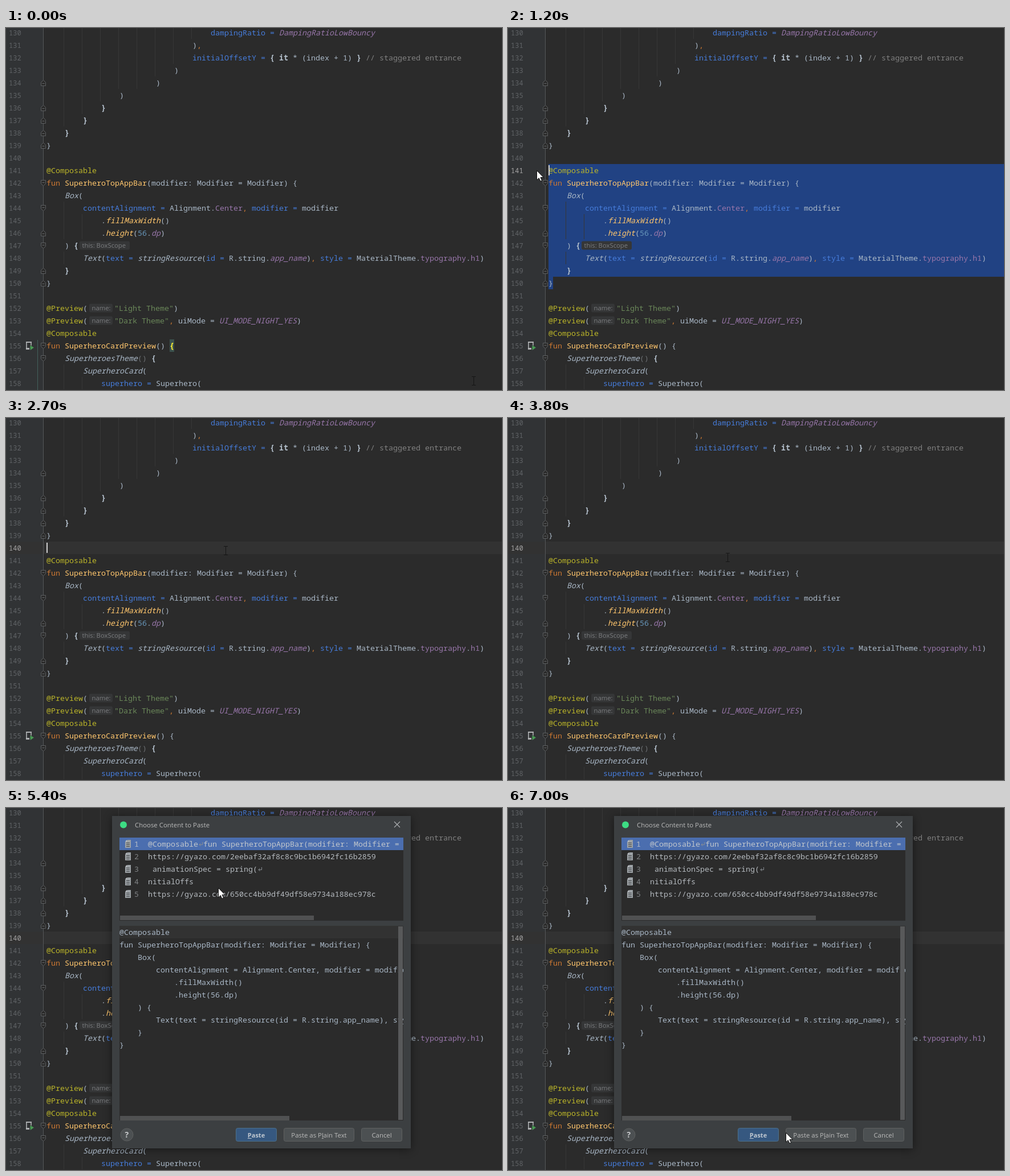
These frames come from a looping animation (870x636 px, 7.1 s). An HTML page with a canvas:

```html
<!DOCTYPE html>
<html lang="en">
<head>
<meta charset="utf-8">
<title>Paste from history</title>
<style>
  html, body { margin: 0; width: 100%; height: 100%; overflow: hidden; background: #2b2b2b; }
  canvas { display: block; width: 870px; height: 636px; }
</style>
</head>
<body>
<canvas id="stage" width="870" height="636"></canvas>
<script>
const ctx = document.getElementById('stage').getContext('2d');
const W = 870, H = 636, LOOP = 7100, STEP = 100;
const ROW = 22, COL = 8, LEFT = 71, FIRST = 130;
const MONO = '"Noto Sans Mono", "DejaVu Sans Mono", monospace';
const SANS = '"Open Sans", "Noto Sans", sans-serif';
const PRESS = 500, DRAG_END = 1300, CLICK = 2700, DIALOG = 4100;

// Each style: colour, font prefix
const STYLES = {
  d: ['#a9b7c6'], i: ['#a9b7c6', 'italic 500'], B: ['#b4c0cc', 'bold'],
  b: ['#467cda'], p: ['#9876aa'], m: ['#9876aa', 'italic 500'],
  o: ['#cc7832'], y: ['#bbb529'], f: ['#ffc66d'], g: ['#ffc66d', 'italic 500'],
  s: ['#6a8759'], n: ['#6897bb'], c: ['#808080'], u: ['#6c6f72']
};

// indent|style+text|...   "h" is an inlay hint
const CODE = [
  '36|bdampingRatio = |mDampingRatioLowBouncy',
  '32|d)|o,',
  '32|binitialOffsetY = |B{ it |d* (index + 1) |B} |c// staggered entrance',
  '28|d)', '24|d)', '16|d)', '12|B}', '8|B}', '4|B}', '0|d}', '0',
  '0|y@Composable',
  '0|ofun |fSuperheroTopAppBar|d(modifier: Modifier = Modifier) {',
  '4|iBox|d(',
  '8|bcontentAlignment = |dAlignment.|pCenter|o, |bmodifier = |dmodifier',
  '12|d.|gfillMaxWidth|d()',
  '12|d.|gheight|d(|n56|d.|mdp|d)',
  '4|d) |B{|hthis: BoxScope',
  '8|iText|d(|btext = |istringResource|d(|bid = |dR.string.|mapp_name|d)|o, |bstyle = |dMaterialTheme.|ptypography|d.|ph1|d)',
  '4|B}', '0|d}', '0',
  '0|y@Preview|d(|hname:|s"Light Theme"|d)',
  '0|y@Preview|d(|hname:|s"Dark Theme"|o, |duiMode = |mUI_MODE_NIGHT_YES|d)',
  '0|y@Composable',
  '0|ofun |fSuperheroCardPreview|d() {',
  '4|iSuperheroesTheme|u() |B{',
  '8|iSuperheroCard|d(',
  '12|bsuperhero = |dSuperhero('
].map(line => line.split('|'));

const FOLD_START = [142, 144, 147, 155, 156];
const FOLD_END = [134, 136, 137, 138, 139, 146, 149, 150];

// column, first row, last row
const GUIDES = [
  [4, 130, 137], [8, 130, 136], [12, 130, 135], [16, 130, 134], [20, 130, 134],
  [24, 130, 133], [28, 130, 132], [32, 130, 130],
  [4, 144, 146], [8, 145, 146], [4, 148, 148], [4, 157, 158], [8, 158, 158]
];

const MOUSE = [
  [0, 820, 620], [100, 820, 620], [500, 82, 448], [900, 48, 315], [1200, 50, 250],
  [1500, 50, 250], [1900, 330, 256], [2300, 400, 232], [2700, 385, 233], [3000, 385, 244],
  [5100, 385, 246], [5400, 372, 140], [5900, 384, 74], [6300, 432, 330],
  [6700, 546, 570], [7000, 487, 570]
];

const CLIPS = [
  '@Composable\nfun SuperheroTopAppBar(modifier: Modifier = Modifier) {',
  'https://gyazo.com/2eebaf32af8c8c9bc1b6942fc16b2859',
  ' animationSpec = spring(\n',
  'nitialOffs',
  'https://gyazo.com/650cc4bb9df49df58e9734a188ec978c'
];

const rowMid = n => 8 + (n - FIRST) * ROW;
const rowTop = n => rowMid(n) - 11;

function rect(x, y, w, h, color) {
  ctx.fillStyle = color;
  ctx.fillRect(x, y, w, h);
}

function pill(x, y, w, h, r, fill, line) {
  ctx.beginPath();
  ctx.roundRect(x, y, w, h, r);
  ctx.fillStyle = fill;
  ctx.fill();
  if (line) {
    ctx.strokeStyle = line;
    ctx.stroke();
  }
}

function poly(points, fill, line) {
  ctx.beginPath();
  points.forEach(([x, y]) => ctx.lineTo(x, y));
  ctx.closePath();
  if (fill) { ctx.fillStyle = fill; ctx.fill(); }
  if (line) { ctx.strokeStyle = line; ctx.stroke(); }
}

function strokes(color, width, ...lines) {
  ctx.strokeStyle = color;
  ctx.lineWidth = width;
  ctx.beginPath();
  for (const [x1, y1, x2, y2] of lines) {
    ctx.moveTo(x1, y1);
    ctx.lineTo(x2, y2);
  }
  ctx.stroke();
  ctx.lineWidth = 1;
}

function text(str, x, y, color, font) {
  ctx.font = font;
  ctx.fillStyle = color;
  ctx.fillText(str, x, y);
}

const mono = (str, x, mid, color, face = '500') =>
  text(str, x, mid + 5, color, `${face} 13.333px ${MONO}`);

function mouseAt(t) {
  const k = Math.max(1, MOUSE.findIndex(p => p[0] >= t));
  const [t0, x0, y0] = MOUSE[k - 1], [t1, x1, y1] = MOUSE[k];
  const u = Math.min(1, (t - t0) / (t1 - t0));
  return { x: x0 + (x1 - x0) * u, y: y0 + (y1 - y0) * u };
}

function caretRow(t) {
  if (t < PRESS) return 0;
  if (t >= CLICK) return 140;
  return FIRST + Math.floor((mouseAt(Math.min(t, DRAG_END)).y + 3) / ROW);
}

function hint(str, x, mid) {
  const w = str === 'name:' ? 41 : 88;
  pill(x + 3, mid - 7.5, w, 15, 3, '#353637');
  text(str, x + 7.5, mid + 4, '#7c7e80', `11.3px ${SANS}`);
}

function codeLine(parts, mid) {
  let x = LEFT + COL * parts[0];
  for (const part of parts.slice(1)) {
    const str = part.slice(1);
    if (part[0] === 'h') {
      hint(str, x - (str === 'name:' ? 0 : 1), mid);
      x += 47;
    } else {
      const [color, face] = STYLES[part[0]];
      mono(str, x, mid, color, face);
      x += str.length * COL;
    }
  }
}

function fold(n, dir) {
  const y = rowMid(n) + 0.5, x = 65.5;
  poly([[x - 4, y - 5 * dir], [x + 4, y - 5 * dir], [x + 4, y + dir], [x, y + 5 * dir], [x - 4, y + dir]],
    '#2b2b2b', '#5c5e60');
  strokes('#66686a', 1, [x - 2, y - dir, x + 2, y - dir]);
}

function runIcon() {
  ctx.lineWidth = 1.6;
  ctx.strokeStyle = '#afb1b3';
  ctx.strokeRect(36, 552, 8, 12);
  ctx.lineWidth = 1;
  rect(35, 551, 10, 2, '#afb1b3');
  rect(35, 562, 8, 3, '#afb1b3');
  poly([[41, 556], [50, 561.5], [41, 567]], '#313335');
  poly([[42.5, 557.5], [49, 561.5], [42.5, 566]], '#499c54');
}

function editor(t) {
  const caret = caretRow(t);
  const selected = t > PRESS && t < CLICK && caret < 150;
  rect(0, 0, W, H, '#2b2b2b');
  rect(0, 0, 65, H, '#313335');
  if (caret && !selected) rect(0, rowTop(caret), W, ROW, '#323232');
  if (selected) {
    rect(LEFT, rowTop(caret), W - LEFT, (150 - caret) * ROW, '#214283');
    rect(LEFT, rowTop(150), COL, ROW, '#214283');
  }
  for (const [col, a, b] of GUIDES)
    rect(LEFT + col * COL - 2, rowTop(a), 1, (b - a + 1) * ROW, '#373737');
  rect(65, 0, 1, H, '#555759');

  if (t < PRESS) {
    rect(55, 548, 1, H - 548, '#43605c');
    rect(287, 547, 8, ROW, '#3b514d');
  }
  CODE.forEach((parts, i) => {
    const n = FIRST + i;
    text(n, 5, rowMid(n) + 5, n === caret ? '#a4a3a3' : '#606366', `12px ${MONO}`);
    codeLine(parts, rowMid(n));
  });
  if (t < PRESS) mono('{', 287, rowMid(155), '#ffef28', 'bold');
  FOLD_START.forEach(n => fold(n, 1));
  FOLD_END.forEach(n => fold(n, -1));
  runIcon();

  const lit = t >= PRESS && t < 1700 || t >= CLICK && t < CLICK + 500;
  if (lit) rect(caret === 150 ? LEFT + COL : LEFT, rowTop(caret) + 2, 2, 18, '#d0d0d0');
}

function returnMark(x, mid) {
  strokes('#888d92', 1, [x + 6.5, mid - 3, x + 6.5, mid + 1.5], [x + 6.5, mid + 1.5, x + 1, mid + 1.5],
    [x + 1, mid + 1.5, x + 3.5, mid - 1], [x + 1, mid + 1.5, x + 3.5, mid + 4]);
}

function pageIcon(x, mid) {
  poly([[x + 4, mid - 7], [x + 10, mid - 7], [x + 10, mid + 7], [x, mid + 7], [x, mid - 3]], '#9da2a6');
  poly([[x, mid - 4], [x + 3, mid - 4], [x + 3, mid - 7]], '#c0c4c7');
  for (const dy of [-2, 1, 4]) rect(x + 2, mid + dy, 6, 1, '#3c3f41');
}

function clipList() {
  rect(199, 52, 498, 146, '#2b2b2b');
  rect(199, 52, 498, ROW, '#4b6eaf');
  CLIPS.forEach((clip, i) => {
    const mid = 63 + i * ROW, color = i ? '#b4b9be' : '#c0c6cc';
    pageIcon(209, mid);
    mono(i + 1, 225, mid, i ? '#7f8284' : '#b5bdc8');
    const [head, tail] = clip.split('\n');
    const end = 249 + head.length * COL;
    mono(head, 249, mid, color);
    if (tail !== undefined) {
      returnMark(end + 1, mid);
      mono(tail, end + 9, mid, color);
    }
  });
  rect(200, 189, 340, 8, '#505152');
}

function preview() {
  rect(199, 207, 498, 342, '#2b2b2b');
  rect(199, 207, 498, ROW, '#323232');
  CODE.slice(11, 21).forEach((parts, i) => {
    const plain = parts.slice(1).filter(p => p[0] !== 'h').map(p => p.slice(1)).join('');
    mono(plain, 199 + parts[0] * COL, 218 + i * ROW, '#a9b7c6');
  });
  rect(688, 208, 8, 340, '#58595a');
  rect(200, 541, 297, 8, '#505152');
}

function clipped(x, y, w, h, draw) {
  ctx.save();
  ctx.beginPath();
  ctx.rect(x, y, w, h);
  ctx.clip();
  draw();
  ctx.restore();
}

// "_" goes before the underlined letter
function button(label, x, w, main) {
  pill(x + 0.5, 562.5, w - 1, 23, 3, main ? '#365880' : '#4c5052', main ? '#4c708c' : '#5e6060');
  const at = label.indexOf('_'), str = label.replace('_', '');
  ctx.font = main ? `bold 11px ${SANS}` : `11.4px ${SANS}`;
  const left = x + (w - ctx.measureText(str).width) / 2;
  const color = main ? '#c0c8d0' : '#bbbbbb';
  text(str, left, 579, color, ctx.font);
  if (at >= 0) {
    const from = left + ctx.measureText(str.slice(0, at)).width;
    rect(from, 580, ctx.measureText(str[at]).width, 1, color);
  }
}

function dialog() {
  ctx.save();
  ctx.shadowColor = 'rgba(0, 0, 0, 0.45)';
  ctx.shadowBlur = 14;
  ctx.shadowOffsetY = 2;
  rect(186, 14, 524, 584, '#3c3f41');
  ctx.restore();
  pill(200, 23.5, 12, 12, 6, '#3ddc84');
  text('Choose Content to Paste', 226, 34, '#bbbbbb', `11.4px ${SANS}`);
  strokes('#afb1b3', 1.1, [681, 24, 691, 34], [691, 24, 681, 34]);

  clipped(199, 52, 498, 146, clipList);
  clipped(199, 207, 498, 342, preview);

  pill(201, 563, 22, 22, 11, '#4c5052', '#5e6060');
  text('?', 208.5, 579, '#c8cacc', `bold 14px ${SANS}`);
  button('_Paste', 403, 72, true);
  button('Paste as P_lain Text', 487, 124);
  button('Cancel', 623, 72);
}

function arrow(x, y) {
  const shape = [[0, 0], [0, 16.5], [3.8, 13], [6.3, 18.7], [9, 17.5], [6.5, 12], [11.7, 12]];
  poly(shape.map(([dx, dy]) => [x + 0.5 + dx, y + 0.5 + dy]), '#ffffff', '#111111');
}

function beam(x, y) {
  const cx = Math.round(x) + 0.5, cy = Math.round(y);
  strokes('#151515', 1, [cx, cy - 7, cx, cy + 7],
    [cx - 3.5, cy - 7.5, cx + 3.5, cy - 7.5], [cx - 3.5, cy + 7.5, cx + 3.5, cy + 7.5]);
}

function pointer(t) {
  const { x, y } = mouseAt(t);
  const overSelection = t > DRAG_END && t < CLICK && y >= rowTop(141);
  if (t > 5100 || x < 62 || overSelection) arrow(x, y);
  else beam(x, y);
}

function draw(now) {
  const t = Math.floor(now % LOOP / STEP) * STEP;
  editor(t);
  if (t >= DIALOG) dialog();
  pointer(t);
  requestAnimationFrame(draw);
}

requestAnimationFrame(draw);
</script>
</body>
</html>
```
